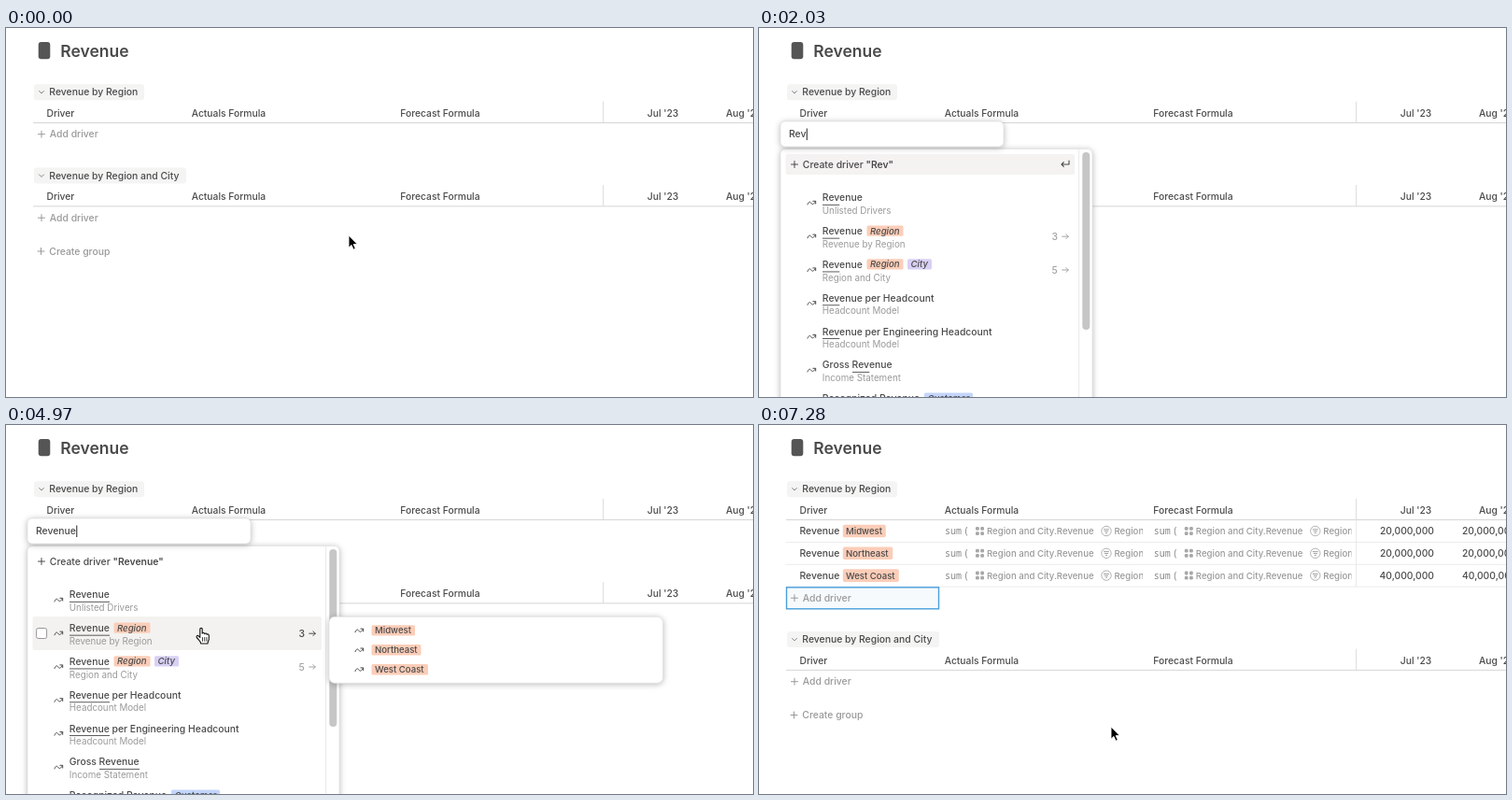
Write an HTML page that moves like this. It is 800 px wide and 395 px high and loops after 8000 ms.

```html
<!DOCTYPE html>
<html lang="en">
<head>
<meta charset="utf-8">
<title>Revenue drivers</title>
<style>
  html, body { margin: 0; width: 100%; height: 100%; overflow: hidden; background: #fff; }
  svg { display: block; width: 800px; height: 395px; font: 500 10.4px Inter, sans-serif; fill: #4a4a4a; }
  text { white-space: pre; }
  .title { font-size: 17.5px; font-weight: 600; }
  .head { font-size: 10.3px; }
  .muted { fill: #999; }
  .sub { font-size: 9.8px; font-weight: 400; fill: #9a9a9a; }
  .hint { font-weight: 400; fill: #aaa; }
  .tag { font-size: 9.6px; }
  .ital { font-style: italic; }
  .formula { font-size: 9.6px; fill: #999; }
  .mono { font: 400 10px "Noto Sans Mono", monospace; fill: #888; }
  .bold { font-weight: 600; }
  .line { fill: none; stroke: #4a4a4a; stroke-linecap: round; stroke-linejoin: round; }
  .panel { fill: #fff; stroke: #e4e4e4; stroke-width: .8; filter: drop-shadow(0 1px 3px rgba(0, 0, 0, .28)); }
</style>
</head>
<body>
<svg id="stage" viewBox="0 0 800 395"></svg>
<script>
const LOOP = 8000, TICK = 70, SHIFT = 71.5, ROW = 35.8;
const ORANGE = '#fbcdb8', PURPLE = '#d9d0f5', BLUE = '#c3d5fb';
const stage = document.getElementById('stage');

// Drawing helpers; text is placed by the vertical centre of its capitals.
const text = (x, y, s, cls = '', extra = '') =>
  `<text x="${x}" y="${y + 3.7}" class="${cls}" ${extra}>${s}</text>`;
const rect = (x, y, w, h, fill, r = 0, extra = '') =>
  `<rect x="${x}" y="${y}" width="${w}" height="${h}" rx="${r}" fill="${fill}" ${extra}/>`;
const path = (d, color = '#4a4a4a', width = 1, x = 0, y = 0) =>
  `<path class="line" d="${d}" transform="translate(${x} ${y})" style="stroke:${color};stroke-width:${width}"/>`;
const group = (id, body, extra = '') => `<g id="${id}" ${extra}>${body}</g>`;
const plus = (x, y, color) => path('M-3.5 0H3.5M0 -3.5V3.5', color, 1, x, y);
const trend = (x, y) => path('M-4.5 1.8C-3.3 -1.4 -2 -1.8 -.6 .3S2 1.6 4 -1.6M1.4 -1.9H4.2V.9', '#4a4a4a', 1, x, y);
const tag = (x, y, w, s, color, cls = '') =>
  rect(x, y - 5.7, w, 11.4, color, 1.5) + text(x + 3.5, y - .3, s, 'tag ' + cls);

function tableHeader(title, width, y) {
  return rect(30, y - 8.5, width, 17, '#f4f4f3', 3) +
    path('M-2.5 -1.2L0 1.3L2.5 -1.2', '#888', 1, 38, y) +
    text(46.3, y, title) +
    [[43.5, 'Driver'], [198.7, 'Actuals Formula'], [422.3, 'Forecast Formula'], [686.8, "Jul '23"], [771, "Aug '23"]]
      .map(([x, s]) => text(x, y + 22.3, s, 'head')).join('') +
    rect(29, y + 32.3, 771, .9, '#d2d2d2') + rect(639.2, y + 10, .9, 23, '#d8d8d8');
}

function formula(x, y, side) {
  const dots = [-2.6, 2.6].flatMap(dx => [-2.6, 2.6].map(dy =>
    rect(x + 37.5 + dx - 1.9, y + dy - 1.9, 3.8, 3.8, '#a8a8a8', 1.3))).join('');
  return `<g clip-path="url(#${side})">` + text(x, y, 'sum', 'mono') + text(x + 20, y, '(', 'mono') + dots +
    text(x + 45, y, 'Region and City.Revenue', 'formula') +
    `<circle cx="${x + 173}" cy="${y}" r="5.2" fill="none" stroke="#aaa" stroke-width=".9"/>` +
    path('M-2.6 -1.7H2.6M-1.7 .2H1.7M-.7 2.1H.7', '#999', .9, x + 173, y) +
    text(x + 181.5, y, 'Region', 'formula') + '</g>';
}

function dataRow(name, tagWidth, amount, i) {
  const y = 113.5 + i * 23.8;
  return text(43.5, y, 'Revenue') + rect(89.8, y - 6.8, tagWidth, 13.6, ORANGE, 2) + text(93, y - .2, name, 'tag') +
    formula(199, y, 'actuals') + formula(422.8, y, 'forecast') +
    text(723, y, amount, 'head', 'text-anchor="end"') + text(753, y, amount, 'head') +
    path(`M29 ${y + 12}H800`, '#e6e6e6', .8);
}

const options = [
  { name: 'Revenue', sub: 'Unlisted Drivers' },
  { name: 'Revenue', sub: 'Revenue by Region', count: 3, tags: [[115.5, 39, 'Region', ORANGE]] },
  { name: 'Revenue', sub: 'Region and City', count: 5, tags: [[115.5, 39, 'Region', ORANGE], [159, 26, 'City', PURPLE]] },
  { name: 'Revenue per Headcount', sub: 'Headcount Model' },
  { name: 'Revenue per Engineering Headcount', sub: 'Headcount Model' },
  { name: 'Gross Revenue', sub: 'Income Statement', mark: 100 },
  { name: 'Recognized Revenue', sub: 'Income Statement', mark: 129, tags: [[177, 52, 'Customer', BLUE]] }
];

function option({ name, sub, count, tags = [], mark = 68 }, i) {
  const y = 181.6 + i * ROW;
  return trend(56.5, y + 5.6) + text(67.8, y, name) + text(67.8, y + 13.7, sub, 'sub') +
    rect(mark, y + 7.3, 43, .9, '#4a4a4a', 0, 'class="mark"') +
    tags.map(([x, w, s, c]) => tag(x, y - .3, w, s, c, 'ital')).join('') +
    (count ? group('count' + i, text(313.5, y + 5.8, count) +
      path('M-3.3 0H3.3M.9 -2.4L3.3 0L.9 2.4', '#4a4a4a', 1, 328, y + 5.8)) : '');
}

stage.innerHTML =
  '<defs><clipPath id="actuals"><rect x="195" y="100" width="216" height="80"/></clipPath>' +
  '<clipPath id="forecast"><rect x="418" y="100" width="216.5" height="80"/></clipPath></defs>' +
  rect(34.7, 15, 12.6, 18.2, '#555', 3) +
  '<text x="58.3" y="30.5" class="title">Revenue</text>' +
  tableHeader('Revenue by Region', 118, 68.7) +
  group('rows', [['Midwest', 46, '20,000,000'], ['Northeast', 53.5, '20,000,000'], ['West Coast', 60, '40,000,000']]
    .map((row, i) => dataRow(...row, i)).join('') + rect(639.2, 101, .9, 72, '#e6e6e6')) +
  group('below',
    rect(29.5, 102.3, 163, 23, '#f2f8fd', 0, 'id="selection" stroke="#4a9fdc" stroke-width="1.4"') +
    plus(38, 113.7, '#999') + text(46.8, 113.7, 'Add driver', 'muted') +
    tableHeader('Revenue by Region and City', 163, 158.1) +
    group('back', path('M3.3 0H-3.3M-.9 -2.4L-3.3 0L-.9 2.4', '#aaa', 1, 178, 180)) +
    plus(38, 203.2, '#999') + text(46.8, 203.2, 'Add driver', 'muted') +
    plus(37.5, 239, '#999') + text(46.3, 239, 'Create group', 'muted')) +
  group('menu',
    '<rect class="panel" x="23" y="129.5" width="334" height="290" rx="5"/>' +
    rect(342.3, 130, .8, 270, '#e4e4e4') + rect(346.3, 133, 8, 190, '#c6c6c6', 4) +
    group('createHot', rect(28.5, 135, 309.5, 22, '#f4f3f2', 2) +
      path('M4 -3V1H-4M-1.7 -1.4L-4 1L-1.7 3.4', '#4a4a4a', 1.1, 328, 145)) +
    group('rowHot', rect(28.5, 169.3, 309.5, ROW, '#f3f2f0', 2) +
      rect(32.6, 181.7, 11, 11, '#fff', 2, 'stroke="#8c8c8c" stroke-width=".9"')) +
    plus(38, 146, '#4a4a4a') +
    text(46.8, 145.8, 'Create driver <tspan id="quoted" class="bold"></tspan>') +
    options.map(option).join('')) +
  group('submenu',
    '<rect class="panel" x="346" y="205.3" width="357.5" height="71" rx="6"/>' +
    [['Midwest', 46.5], ['Northeast', 53], ['West Coast', 60.5]].map(([s, w], i) =>
      trend(378.5, 220 + i * 20.9) + tag(391.5, 219.9 + i * 20.9, w, s, ORANGE)).join('')) +
  group('search',
    '<rect class="panel" x="23" y="100" width="239" height="27" rx="5"/>' +
    text(33, 113.7, 'Type to search or create', 'hint', 'id="hint"') +
    text(32, 113.7, '', '', 'id="typed"') + rect(0, 107.5, 1, 12.5, '#222', 0, 'id="caret"')) +
  '<circle id="ring" fill="none" stroke="#2f7fe0" stroke-width="1"/>' +
  group('cursor',
    group('arrow', '<path d="M0 0V13.2L3 10.4L5.1 15.2L7.3 14.2L5.2 9.6H9.3Z" fill="#000" stroke="#fff" stroke-width=".9"/>') +
    group('beam', path('M-2.8 -7.5Q0 -7.5 0 -5.5Q0 -7.5 2.8 -7.5M0 -5.5V5.5M-2.8 7.5Q0 7.5 0 5.5Q0 7.5 2.8 7.5M-1.6 1.8H1.6', '#111', 1.3)) +
    group('hand', '<path d="M-1.2 1.5C-1.2 0 1.2 0 1.2 1.5V6.2C1.6 5 3.6 5.2 3.7 6.6C4.3 5.6 6 5.9 6.1 7.2C7 6.6 8.3 7 8.3 8.3V12C8.3 14 7 14.7 7 17H-.2C-.4 14.6 -3 13 -4.7 10.4C-5.6 8.8 -3.8 7.8 -2.7 9L-1.2 10.4Z" fill="#fff" stroke="#111" stroke-width="1.1" stroke-linejoin="round"/>' +
      path('M1.5 10.5V14.3M3.7 10.5V14.3M5.9 10.5V14.3', '#111', .8)));

const el = {};
stage.querySelectorAll('[id]').forEach(node => el[node.id] = node);
const marks = stage.querySelectorAll('.mark');
const show = (id, on) => el[id].setAttribute('display', on ? 'inline' : 'none');
const set = (id, attrs) => Object.entries(attrs).forEach(([k, v]) => el[id].setAttribute(k, v));

const smooth = p => p * p * (3 - 2 * p);
const slowing = p => 1 - (1 - p) ** 2;
const moves = [
  [0, 490, 367, 222, 62, 108, smooth],
  [3570, 3640, 62, 108, 67, 117, smooth],
  [3640, 4340, 67, 117, 209, 217, slowing],
  [6440, 6790, 209, 217, 377, 323, smooth]
];
const keyTimes = [1540, 1610, 1750, 2100, 2170, 2310, 2380];
const clicks = [[910, 62, 108], [5670, 209, 217]];

function pointer(t) {
  const [from, to, x0, y0, x1, y1, ease] = moves.filter(m => t >= m[0]).pop();
  const p = ease(Math.min(1, (t - from) / (to - from)));
  return [x0 + (x1 - x0) * p, y0 + (y1 - y0) * p];
}

function draw(t) {
  const [x, y] = pointer(t);
  const open = t >= 980 && t < 5740, done = t >= 5740, menu = open && t >= 2030;
  const typed = 'Revenue'.slice(0, keyTimes.filter(k => t >= k).length);

  show('rows', done);
  show('selection', done);
  show('back', done && t < 6510);
  set('selection', { fill: t < 6510 ? '#f0f7fd' : '#f6fafd' });
  set('below', { transform: `translate(0 ${done ? SHIFT : 0})` });

  show('search', open);
  show('hint', !typed);
  el.typed.textContent = typed;
  show('caret', t < 2400 || Math.floor((t - 4700) / 500) % 2 === 0);
  set('caret', { x: 32.3 + (typed ? el.typed.getComputedTextLength() : 0) });

  show('menu', menu);
  el.quoted.textContent = `"${typed}"`;
  marks.forEach(m => m.setAttribute('width', t < 2520 ? 18.3 : 43));
  const hot = t < 3080 ? -1 : y < 205 ? 0 : 1;
  show('createHot', hot < 0);
  show('rowHot', hot >= 0);
  set('rowHot', { transform: `translate(0 ${Math.max(0, hot) * ROW})` });
  set('count1', { opacity: hot === 1 ? 1 : .5 });
  set('count2', { opacity: .5 });
  show('submenu', menu && t >= 4620);

  const click = clicks.find(([at]) => t >= at && t < at + 420);
  show('ring', click);
  if (click) {
    const p = (t - click[0]) / 420;
    set('ring', { cx: click[1], cy: click[2], r: 3 + 33 * slowing(p), opacity: Math.min(.8, 1.3 * (1 - p)) });
  }

  const kind = open ? (y > 128 ? 'hand' : 'beam') : !done && y < 126 ? 'hand' : 'arrow';
  ['arrow', 'beam', 'hand'].forEach(id => show(id, id === kind));
  show('cursor', t < 1540 || t >= 3640);
  set('cursor', { transform: `translate(${x} ${y})` });
}

const start = performance.now();
function frame() {
  const t = (performance.now() - start) % LOOP;
  draw(Math.floor(t / TICK) * TICK);
  requestAnimationFrame(frame);
}
frame();
</script>
</body>
</html>
```
